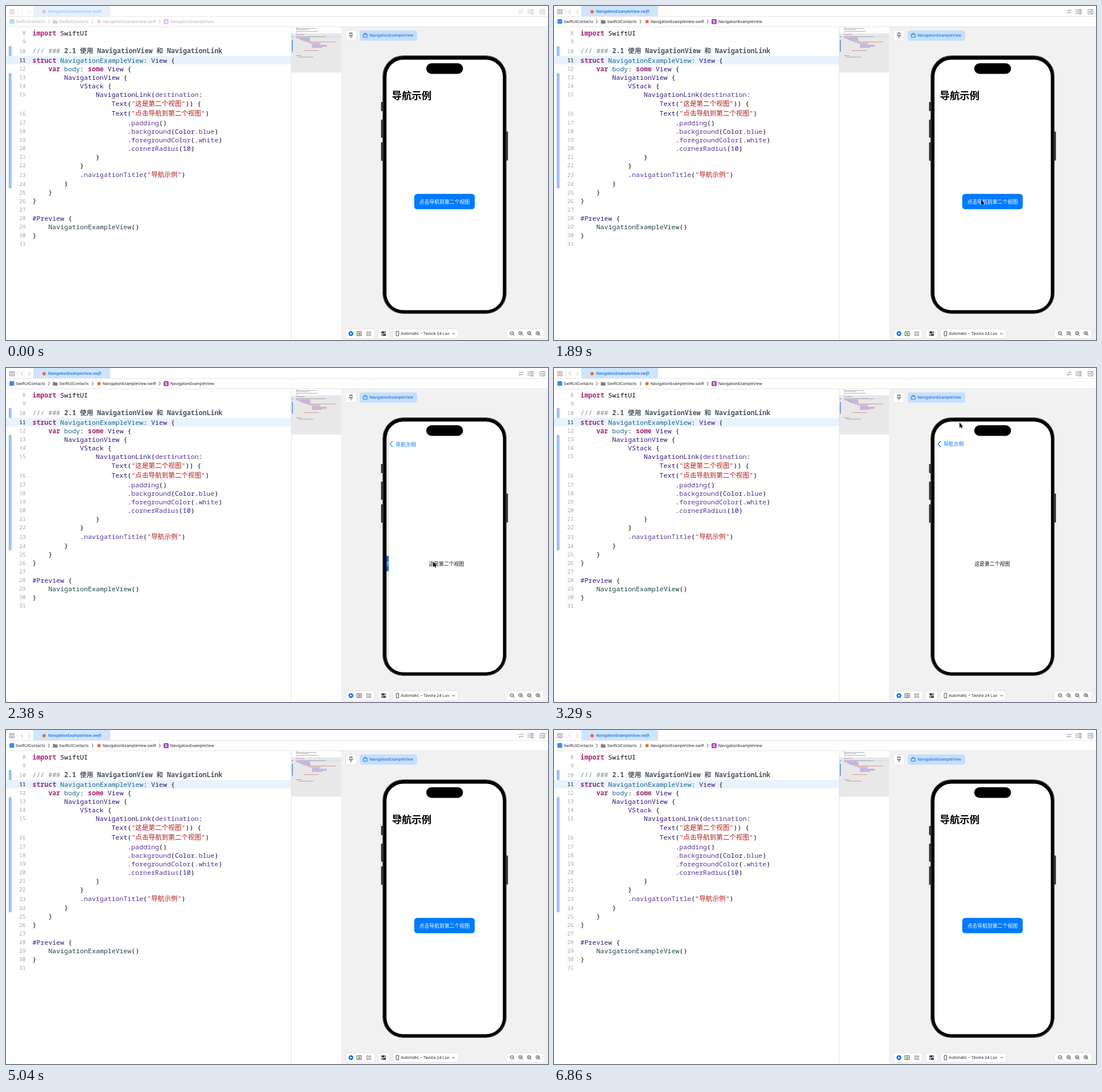
An HTML page that plays this animation: 953x588 px, repeating every 6930 ms.

```html
<!DOCTYPE html>
<html lang="zh-CN">
<head>
<meta charset="utf-8">
<title>Navigation example</title>
<style>
html, body { margin: 0; width: 100%; height: 100%; overflow: hidden; background: #fff; }
svg { display: block; width: 953px; height: 588px; }
text { white-space: pre; font-family: Inter, "Noto Sans CJK SC", "Noto Sans CJK", sans-serif; }
.code text { font: 500 11.6px "Noto Sans Mono", "Noto Sans CJK SC", "Noto Sans CJK", monospace; fill: #111; }
.code .num { font-size: 9.5px; font-weight: 400; fill: #a6a6a6; text-anchor: end; }
.code .on { fill: #111; }
.k { fill: #a32a78; font-weight: 600; }
.c { fill: #7b8794; }
.h { fill: #4a5560; font-weight: 700; }
.d { fill: #1a658f; }
.t { fill: #351679; }
.m { fill: #5c3596; }
.s { fill: #b01e1a; }
.n { fill: #1c22b8; }
.p { fill: #1c464a; }
.ui { font-size: 6.8px; }
.line { fill: none; stroke: #3c3c3c; stroke-width: .9; stroke-linecap: round; stroke-linejoin: round; }
.soft { stroke: #8c8c8c; }
.pill { fill: #fff; stroke: #dedede; stroke-width: .7; }
.cjk { font-size: 8.9px; }
</style>
</head>
<body>
<svg viewBox="0 0 953 588">
  <defs>
    <clipPath id="screen"><rect x="669" y="94.600" width="204.600" height="441" rx="29.500"/></clipPath>
  </defs>
  <rect width="953" height="588" fill="#fff"/>

  <!-- window bars -->
  <g class="line soft" id="icons">
    <path d="M6.500 6h3v3h-3zM11.500 6h3v3h-3zM6.500 11h3v3h-3zM11.500 11h3v3h-3z"/>
    <path d="M29.500 6.500l-3.500 3.500 3.500 3.500M39.500 6.500l3.500 3.500-3.500 3.500" opacity=".6"/>
    <path d="M20.500 5v10" stroke="#ddd"/>
    <path d="M902 8h7l-2-2M909 11.500h-7l2 2"/>
    <path d="M917 7h4M917 10h4M917 13h4M923 6h4v8h-4zM925 6v8"/>
    <path d="M939.500 6h8v8h-8zM945 6v8M941 10h2.500M942.200 8.800v2.500"/>
  </g>
  <rect id="tab" x="48" width="135" height="18" fill="#cfe5fd"/>
  <path d="M0 18.500H953M0 36.500H953" stroke="#e6e6e6"/>
  <g id="bars">
    <circle cx="67" cy="10" r="3" fill="#f26a3d"/>
    <text x="74" y="12.400" font-size="6.6" font-style="italic" font-weight="500" fill="#0a66d8">NavigationExampleView.swift</text>
    <rect x="6" y="23" width="8.500" height="8.500" rx="2" fill="#3a8ef6"/>
    <path d="M82.500 24.500h3l1 1h4v5.500h-8z" fill="#7d7d7d"/>
    <circle cx="163.500" cy="27.500" r="3" fill="#f26a3d"/>
    <rect x="277" y="23" width="9" height="9" rx="2" fill="#b044cf"/>
    <text x="281.500" y="29.900" font-size="6.5" font-weight="700" fill="#fff" text-anchor="middle">S</text>
    <g class="ui" fill="#222">
      <text x="17" y="29.900">SwiftUIContacts</text>
      <text x="93.500" y="29.900">SwiftUIContacts</text>
      <text x="170" y="29.900">NavigationExampleView.swift</text>
      <text x="289" y="29.900">NavigationExampleView</text>
    </g>
    <path class="line" d="M74.500 24.500l1.800 3-1.800 3M151.500 24.500l1.800 3-1.800 3M269.500 24.500l1.800 3-1.800 3"/>
  </g>

  <!-- editor -->
  <rect y="88" width="501" height="14.800" fill="#e8f3fe"/>
  <g fill="#a8cffb" stroke="#5b9eee" stroke-width=".9">
    <rect x="5.500" y="71" width="3.500" height="16.500" rx="1"/>
    <rect x="5.500" y="118.500" width="3.500" height="202" rx="1"/>
  </g>
  <g class="code" id="code"></g>
  <path d="M501.500 37V588" stroke="#e4e4e4"/>
  <rect x="502" y="48" width="87" height="69" fill="#e8e8e8"/>
  <rect x="502" y="53" width="87" height="2" fill="#d8e1ec"/>
  <path d="M503.500 59.500V80.500M503.500 53.500v1.500" stroke="#3f83dc" stroke-width="1.400"/>
  <g id="map" opacity=".6"></g>

  <!-- preview canvas -->
  <rect x="589" y="37" width="364" height="551" fill="#f1f1f1"/>
  <rect class="pill" x="597" y="43" width="19.500" height="18" rx="4"/>
  <path class="line" d="M604 47.500h5M605 47.500v3l-1.500 2h6l-1.500-2v-3M606.500 52.500v4"/>
  <rect x="622" y="43" width="101" height="18" rx="4.500" fill="#c5dffc"/>
  <path class="line" d="M628.500 50h6.500v5h-6.500zM629.500 50l1-2h2.500l1 2" style="stroke:#0a6be0"/>
  <text class="ui" x="639" y="54.400" fill="#0a63d6">NavigationExampleView</text>

  <g fill="#2a2a2a">
    <rect x="659.500" y="169" width="4" height="16" rx="1"/>
    <rect x="659.500" y="200" width="4" height="32" rx="1"/>
    <rect x="659.500" y="240" width="4" height="32.500" rx="1"/>
    <rect x="879" y="221" width="3.500" height="51" rx="1"/>
  </g>
  <rect x="662.800" y="87.800" width="216.600" height="453.400" rx="36" fill="#000" stroke="#444" stroke-width="1.500"/>
  <g clip-path="url(#screen)">
    <rect x="669" y="94" width="205" height="442" fill="#fff"/>
    <g id="home">
      <g id="link">
        <rect x="717.800" y="330.800" width="106.400" height="27" rx="5.300" fill="#007aff"/>
        <text class="cjk" x="771" y="347.800" fill="#fff" text-anchor="middle">点击导航到第二个视图</text>
      </g>
    </g>
    <rect id="dim" x="669" y="94" width="205" height="442"/>
    <g id="sheet">
      <rect x="669.500" y="94" width="205" height="442" fill="#fff"/>
      <text class="cjk" x="771" y="347.800" fill="#111" text-anchor="middle">这是第二个视图</text>
    </g>
    <path id="back" d="M679.500 129.500l-4.500 4.500 4.500 4.500" fill="none" stroke="#007aff" stroke-width="1.400" stroke-linecap="round" stroke-linejoin="round"/>
    <g id="title" font-size="17.4">
      <text id="bold" y="6.300" font-weight="700">导航示例</text>
      <text id="thin" y="6.300" fill="#007aff">导航示例</text>
    </g>
  </g>
  <rect x="739" y="100.800" width="64.500" height="18.800" rx="9.400"/>

  <!-- canvas controls -->
  <g class="pill">
    <rect x="597" y="568.500" width="51" height="16.500" rx="4"/>
    <rect x="654" y="568.500" width="20.500" height="16.500" rx="4"/>
    <rect x="680" y="568.500" width="115" height="16.500" rx="4"/>
    <rect x="880" y="568.500" width="65.500" height="16.500" rx="4"/>
  </g>
  <circle cx="606.500" cy="576.800" r="4.200" fill="#0a74f5"/>
  <path d="M605.300 574.800l3.400 2-3.400 2z" fill="#fff"/>
  <g class="line">
    <path d="M617.500 573.300h7v7h-7zM620.300 575.300v3.500l2.200-1.300z"/>
    <path class="soft" d="M634.500 573.500h2.500v2.500h-2.500zM639 573.500h2.500v2.500h-2.500zM634.500 578h2.500v2.500h-2.500zM639 578h2.500v2.500h-2.500z"/>
    <path d="M661.500 574.500h5M661.500 579h5" stroke-width="3.400"/>
    <path d="M686.500 572.800h4v8h-4zM785 576l2 2 2-2"/>
  </g>
  <path d="M665 574.500h2M661 579h2" stroke="#fff" stroke-width="1.600"/>
  <text class="ui" x="694" y="579.300" fill="#222">Automatic – Tavora 24 Lux</text>
  <g class="line" id="zoom"></g>

  <path id="cursor" d="M0 0V9.200L2.100 7.300 3.600 10.400 5 9.800 3.600 6.700H6.300Z" stroke="#fff" stroke-width="1" paint-order="stroke"/>
</svg>
<script>
const $ = id => document.getElementById(id);

// Code lines: number, middle y, indent, text with ~class+token~ marks
const lines = [
  [8, 47.5, 0, '~kimport~ SwiftUI'],
  [9, 62.5, 0, ''],
  [10, 79, 0, '~c/// ### ~~h2.1 使用 NavigationView 和 NavigationLink~'],
  [11, 95.5, 0, '~kstruct~ ~dNavigationExampleView~: ~tView~ {'],
  [12, 110.5, 4, '~kvar~ ~dbody~: ~ksome~ ~tView~ {'],
  [13, 125.5, 8, '~tNavigationView~ {'],
  [14, 140.5, 12, '~tVStack~ {'],
  [15, 155.5, 16, '~tNavigationLink~(~mdestination~:'],
  ['', 171.5, 20, '~tText~(~s"这是第二个视图"~)) {'],
  [16, 189, 20, '~tText~(~s"点击导航到第二个视图"~)'],
  [17, 205.5, 24, '.~mpadding~()'],
  [18, 220.5, 24, '.~mbackground~(~tColor~.~mblue~)'],
  [19, 235.5, 24, '.~mforegroundColor~(.~mwhite~)'],
  [20, 250.5, 24, '.~mcornerRadius~(~n10~)'],
  [21, 265.5, 16, '}'],
  [22, 280.5, 12, '}'],
  [23, 297, 12, '.~mnavigationTitle~(~s"导航示例"~)'],
  [24, 313, 8, '}'],
  [25, 328, 4, '}'],
  [26, 343, 0, '}'],
  [27, 358.5, 0, ''],
  [28, 373.5, 0, '~t#Preview~ {'],
  [29, 388.5, 4, '~pNavigationExampleView~()'],
  [30, 403.5, 0, '}'],
  [31, 418.5, 0, '']
];
const paint = s => s.replace(/~(\w)(.*?)~/g, '<tspan class="$1">$2</tspan>');
$('code').innerHTML = lines.map(([n, y, indent, s]) =>
  `<text class="num${n === 11 ? ' on' : ''}" x="34.6" y="${y + 3.6}">${n}</text>` +
  `<text x="${46.6 + indent * 6.95}" y="${y + 4}">${paint(s)}</text>`).join('');

// Minimap rows: x, y, width, colour
const gray = '#777', pink = '#c2559f', violet = '#8257bd', red = '#cf5a66';
$('map').innerHTML = [
  [510, 38, 2, gray], [510, 39, 36, gray], [510, 41, 22, gray], [510, 44, 38, gray], [510, 46, 2, gray],
  [510, 50, 15, pink], [510, 53.5, 52, gray], [510, 55.6, 24, violet], [515, 57.3, 20, violet],
  [518, 59, 17, violet], [522, 61, 14, violet], [528, 62.8, 51, red], [533, 64.8, 20, red],
  [538, 66.8, 13, violet], [538, 68.6, 26, violet], [538, 70.4, 26, violet], [538, 72.3, 18, violet],
  [524, 78, 26, red], [510, 87, 9, violet], [514, 89.5, 26, gray]
].map(([x, y, w, c]) => `<rect x="${x}" y="${y}" width="${w}" height="1" fill="${c}"/>`).join('');

$('zoom').innerHTML = ['M888 576h3', 'M903.5 576h2.5M904.7 574.8v2.5', 'M918.5 575.3h2.5M918.5 577h2.5', 'M933.5 576h3M935 574.5v3']
  .map((sign, i) => {
    const x = 889.5 + i * 15.1;
    return `<circle cx="${x}" cy="576" r="3"/><path d="M${x + 2.2} 578.2l2.2 2.2"/><path d="${sign}" stroke-width=".7"/>`;
  }).join('');

// Pointer path: time, x, y
const path = [
  [70, 804, 566], [350, 796, 440], [700, 778, 356], [840, 771, 341], [910, 771, 341], [980, 751, 341],
  [2870, 751, 341], [3080, 738, 230], [3290, 713, 96], [3570, 709, 118], [3780, 694, 135],
  [4970, 694, 135], [5040, 690, 148], [5320, 716, 471], [5460, 716, 471], [6020, 752, 590]
];
const LOOP = 6930, STEP = 70, WIDTH = 203;
const clamp = v => Math.max(0, Math.min(1, v));
const mix = (a, b, p) => a + (b - a) * p;
const spring = ms => {
  const k = Math.max(0, ms) * .0183;
  return 1 - (1 + k) * Math.exp(-k);
};
const move = (id, x, y = 0, s = 1) => $(id).setAttribute('transform', `translate(${x} ${y}) scale(${s})`);
const fade = (id, v) => $(id).setAttribute('opacity', v);

function movePointer(t) {
  const i = path.findIndex(k => k[0] > t);
  fade('cursor', i > 0 ? 1 : 0);
  if (i < 1) return;
  const [t0, x0, y0] = path[i - 1], [t1, x1, y1] = path[i];
  const p = (t - t0) / (t1 - t0);
  move('cursor', mix(x0, x1, p), mix(y0, y1, p));
}

function render(t) {
  const active = t >= 1890, popping = t >= 4237;
  fade('bars', active ? 1 : .35);
  fade('icons', active ? 1 : .5);
  fade('tab', active ? 1 : .55);

  let p = popping ? 1 - spring(t - 4237) : spring(t - 2050);
  if (p < .002) p = 0;
  if (p > .998) p = 1;
  move('home', -.3 * WIDTH * p);
  move('sheet', p === 1 ? -.5 : WIDTH * (1 - p));
  $('sheet').style.display = p ? '' : 'none';
  fade('dim', .1 * p);
  fade('link', t < 1960 ? 1 : mix(.3, 1, clamp((t - 2050) / 280)));

  const alpha = popping ? 1 - .7 * p : 1, thin = clamp(p * 2 - 1);
  move('title', mix(678.5, 685, p), mix(158, 134, p), mix(1, 8.9 / 17.4, p));
  $('bold').setAttribute('fill', `rgb(0 ${122 * p} ${255 * p})`);
  fade('bold', alpha * (1 - thin));
  fade('thin', alpha * thin);
  fade('back', clamp(p * 10 - 9));
  movePointer(t);
}

function tick() {
  const t = performance.now() % LOOP;
  render(Math.floor(t / STEP) * STEP);
  requestAnimationFrame(tick);
}
tick();
</script>
</body>
</html>
```
